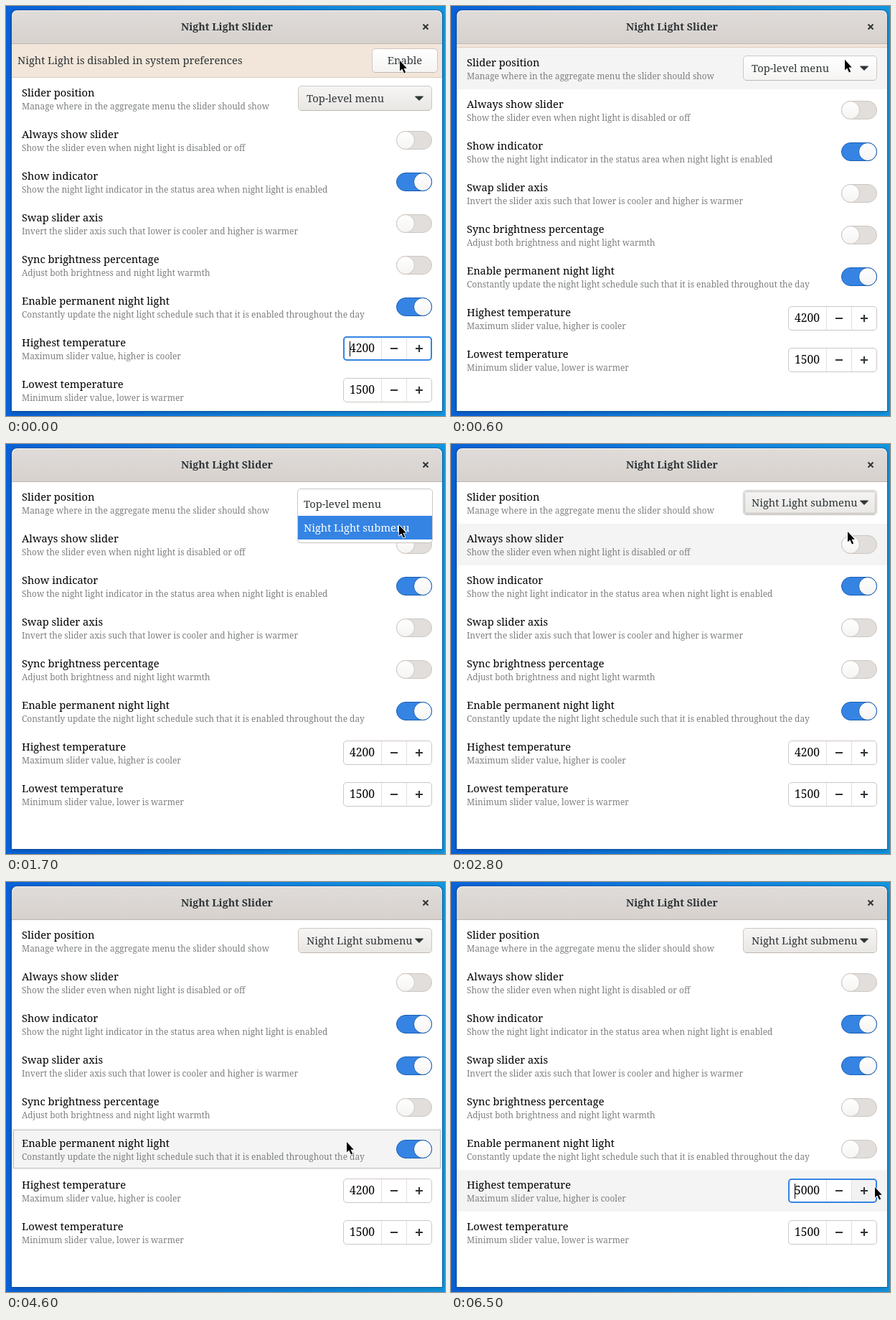
An HTML page for the animation above (6.7 s loop, 612x571 px).

```html
<!DOCTYPE html>
<html lang="en">
<head>
<meta charset="utf-8">
<title>Night Light Slider</title>
<style>
  html, body { margin: 0; width: 100%; height: 100%; overflow: hidden; }
  svg { display: block; width: 612px; height: 571px; }
  text { font: 14.7px "Noto Serif", serif; fill: #2e3436; white-space: pre; }
  .title { font-weight: bold; font-size: 14.3px; }
  .name, .value { fill: #000; }
  .value { font-size: 15.6px; }
  .note { font-size: 11.9px; fill: #7d7f80; }
  .light { fill: #fff; }
  .mid { text-anchor: middle; }
  .focus { fill: none; stroke: #8b8e8f; stroke-dasharray: 1 1; }
</style>
</head>
<body>
<svg viewBox="0 0 612 571">
  <defs>
    <linearGradient id="sky"><stop stop-color="#0a62d8"/><stop offset=".5" stop-color="#0f7ddd"/><stop offset="1" stop-color="#1396e0"/></linearGradient>
    <linearGradient id="header" x2="0" y2="1"><stop stop-color="#e0dcd9"/><stop offset="1" stop-color="#d6d1cd"/></linearGradient>
    <linearGradient id="button" x2="0" y2="1"><stop stop-color="#f6f5f4"/><stop offset="1" stop-color="#e9e7e4"/></linearGradient>
    <linearGradient id="hover" x2="0" y2="1"><stop stop-color="#fff"/><stop offset="1" stop-color="#f5f4f3"/></linearGradient>
    <clipPath id="view"><path d="M8 53H608V564H8Z"/></clipPath>
    <filter id="shadow" x="-10%" y="-10%" width="120%" height="120%"><feGaussianBlur stdDeviation="3"/></filter>
  </defs>
  <path fill="url(#sky)" d="M0 0H612V571H0Z"/>
  <path opacity=".25" filter="url(#shadow)" d="M8 14q0-6 6-6H602q6 0 6 6V566H8Z"/>
  <path fill="#fff" d="M8 53H608V564H8Z"/>
  <g id="content" clip-path="url(#view)"></g>
  <path fill="url(#header)" d="M8 53V14q0-8 8-8H600q8 0 8 8V53Z"/>
  <path fill="none" stroke="#f5f3f2" d="M9 14q0-7.5 7-7.5H600q7 0 7 7.5"/>
  <path stroke="#bfb8b1" d="M8 52.5H608"/>
  <text class="title mid" x="308" y="34">Night Light Slider</text>
  <path stroke="#2e3436" stroke-width="2" d="M581.5 25.5l7 7m0-7l-7 7"/>
  <path fill="none" stroke="#0b3f86" stroke-opacity=".45" d="M7.5 564.5V14q0-8.5 8.5-8.5H600q8.5 0 8.5 8.5V564.5Z"/>
  <g id="overlay"></g>
</svg>
<script>
const LOOP = 6700, STEP = 100, ROW = 58, TOP = 53, BAR = 47;
const content = document.getElementById('content');
const overlay = document.getElementById('overlay');

const rows = [
  ['Slider position', 'Manage where in the aggregate menu the slider should show'],
  ['Always show slider', 'Show the slider even when night light is disabled or off'],
  ['Show indicator', 'Show the night light indicator in the status area when night light is enabled'],
  ['Swap slider axis', 'Invert the slider axis such that lower is cooler and higher is warmer'],
  ['Sync brightness percentage', 'Adjust both brightness and night light warmth'],
  ['Enable permanent night light', 'Constantly update the night light schedule such that it is enabled throughout the day'],
  ['Highest temperature', 'Maximum slider value, higher is cooler'],
  ['Lowest temperature', 'Minimum slider value, lower is warmer']
];
const options = ['Top-level menu', 'Night Light submenu'];

// Pointer path: time, x, y
const path = [
  [0, 549, 76], [1000, 549, 74], [1400, 549, 74], [1500, 548, 82], [1700, 548, 113], [2700, 548, 113],
  [2800, 553, 122], [3000, 574, 205], [3200, 567, 282], [3300, 567, 282],
  [3600, 567, 261], [3900, 567, 261], [4400, 481, 371], [4500, 475, 362],
  [4800, 475, 362], [5100, 560, 437], [5400, 591, 425], [LOOP, 591, 425]
];

const clamp = v => Math.max(0, Math.min(1, v));
const ramp = (t, start, length) => clamp((t - start) / length);

function pointer(t) {
  const i = path.findIndex(p => p[0] > t);
  const [t0, x0, y0] = path[i - 1], [t1, x1, y1] = path[i];
  const k = (t - t0) / (t1 - t0);
  return [x0 + (x1 - x0) * k, y0 + (y1 - y0) * k];
}

const text = (x, y, s, cls = '') => `<text class="${cls}" x="${x}" y="${y}">${s}</text>`;
const box = (x, y, w, h, r, fill, stroke) =>
  `<rect x="${x + .5}" y="${y + .5}" width="${w - 1}" height="${h - 1}" rx="${r}" fill="${fill}" stroke="${stroke}"/>`;
const fill = (x, y, w, h, color) => `<path fill="${color}" d="M${x} ${y}h${w}v${h}h${-w}z"/>`;
const focusRing = (x, y, w, h, r = 0) =>
  `<rect class="focus" x="${x + .5}" y="${y + .5}" width="${w - 1}" height="${h - 1}" rx="${r}"/>`;

function button(x, y, w, h, look, focused) {
  return box(x, y, w, h, 4.5, look, '#cdc7c2') +
    `<path stroke="#bfb8b1" d="M${x + 4} ${y + h - .5}h${w - 8}"/>` +
    (focused ? focusRing(x + 2, y + 2, w - 4, h - 4, 3) : '');
}

function toggle(y, on) {
  const edge = on > .5 ? '#185fb4' : '#cdc7c2';
  return box(544, y + 16, 50, 26, 12.5, on > .5 ? '#3584e4' : '#e1dedb', edge) +
    `<circle cx="${557 + 24 * on}" cy="${y + 29}" r="12.5" fill="url(#hover)" stroke="${edge}"/>`;
}

function spinner(y, value, focused, caret, plus) {
  return box(470, y + 12, 124, 34, 4.5, '#fff', '#cdc7c2') +
    (plus ? fill(559, y + 13, 34, 32, plus) : '') +
    `<path stroke="#e3e0dd" d="M523.5 ${y + 13}v32M558.5 ${y + 13}v32"/>` +
    `<path stroke="#2e3436" stroke-width="2" d="M536 ${y + 29}h10M571 ${y + 29}h10m-5 -5v10"/>` +
    text(479, y + 34, value, 'value') +
    (focused ? `<rect x="471" y="${y + 13}" width="122" height="32" rx="4" fill="none" stroke="#3584e4" stroke-width="2"/>` : '') +
    (caret ? fill(479, y + 19, 1, 21, '#000') : '');
}

function infoBar(y, t) {
  const look = t < 300 ? 'url(#hover)' : '#dedad6';
  return fill(8, y, 600, BAR, '#f2e6da') + fill(8, y + BAR - 1, 600, 1, '#dccdbf') +
    text(16, y + 28, 'Night Light is disabled in system preferences') +
    button(510, y + 6, 92, 34, look, t >= 300) +
    text(556, y + 28, 'Enable', 'mid');
}

function popup(selected) {
  return box(406, 63, 189, 76, 4.5, '#0001', 'none') +
    box(406, 62, 189, 76, 4.5, '#fff', '#cdc7c2') +
    fill(407, 67 + 33 * selected, 187, 33, '#3584e4') +
    options.map((s, i) => text(415, 89 + 33 * i, s, i === selected ? 'light' : '')).join('');
}

function draw(t) {
  const [px, py] = pointer(t);
  const shift = BAR * (1 - (1 - ramp(t, 467, 250)) ** 3);
  const barY = Math.round(TOP - shift);
  const open = t >= 1000 && t < 2100;
  const first = barY + BAR;
  const hovered = open && t >= 1500 ? -1 : Math.floor((py - first) / ROW);

  const on = [0, 0, 1, ramp(t, 3700, 200), 0, 1 - ramp(t, 4600, 200)];
  const high = 4200 + (t >= 5500 ? 100 : 0) + 100 * Math.round(7 * ramp(t, 5700, 700));
  const editing = t < 300 || t >= 5500;
  const caret = t < 300 || t >= 6500;
  const plus = t >= 5500 && t < 6500 ? '#dedbd8' : t >= 5400 ? '#f2f2f2' : '';

  let out = barY + BAR > TOP ? infoBar(barY, t) : '';
  rows.forEach(([name, note], i) => {
    const y = first + ROW * i;
    if (i === hovered) out += fill(8, y, 600, ROW, t === 4500 ? '#e6e6e6' : '#f4f4f4');
    out += text(22, y + 26, name, 'name') + text(22, y + 44, note, 'note');
    if (i === 0) {
      const look = hovered === 0 ? 'url(#hover)' : 'url(#button)';
      out += button(407, y + 11, 187, 35, look, t >= 2100 && t < 4500) +
        text(419, y + 34, options[t < 2100 ? 0 : 1]) +
        `<path fill="#2e3436" stroke="#2e3436" stroke-linejoin="round" d="M570.5 ${y + 26}h11l-5.5 5.5z"/>`;
    } else if (i < 6) out += toggle(y, on[i]);
    else if (i === 6) out += spinner(y, high, editing, caret, plus);
    else out += spinner(y, 1500);
    if (i === 5 && t >= 4500 && t < 5500) out += focusRing(10, y + 2, 596, 54);
  });
  content.innerHTML = out;

  overlay.innerHTML = (open ? popup(py > 100 ? 1 : 0) : '') +
    `<path transform="translate(${px} ${py})" stroke="#fff" stroke-linejoin="round" paint-order="stroke"
      stroke-width="1.6" d="M0 0V14.6L3.2 11.6L6 17.6L8.2 16.6L5.5 10.7H9.8Z"/>`;
}

let shown = -1;
function tick() {
  const t = Math.floor(performance.now() % LOOP / STEP) * STEP;
  if (t !== shown) draw(shown = t);
  requestAnimationFrame(tick);
}
tick();
</script>
</body>
</html>
```
